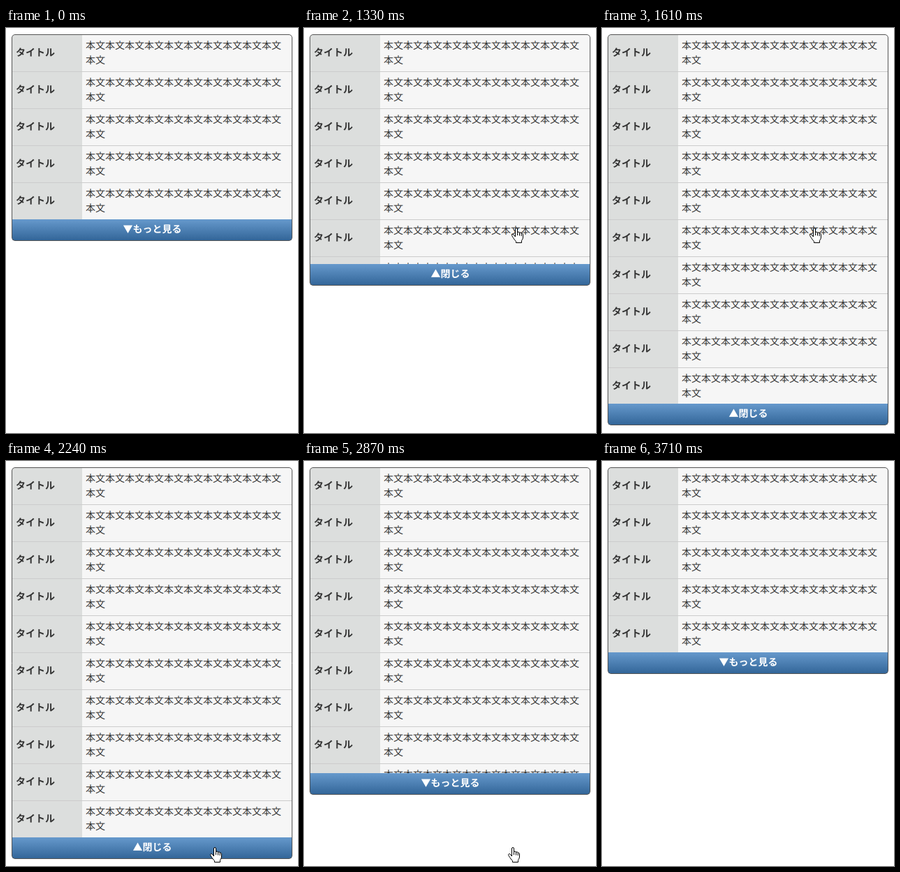
An HTML page with a canvas that plays this animation: 418x580 px, repeating every 4060 ms.

```html
<!DOCTYPE html>
<html lang="ja">
<head>
<meta charset="utf-8">
<title>もっと見る</title>
<style>
  html, body { margin: 0; width: 100%; height: 100%; overflow: hidden; background: #fff; }
  canvas { display: block; }
</style>
</head>
<body>
<canvas id="stage" width="418" height="580"></canvas>
<script>
const ctx = document.getElementById('stage').getContext('2d');
const LOOP = 4060, STEP = 70;
const ROW = 53, LEFT = 9, TOP = 10, WIDTH = 400, HEAD = 100, BUTTON = 30;
const CLOSED = ROW * 5 - 1, OPEN = ROW * 10 - 1;
const FAMILY = '"Noto Sans CJK JP", "Noto Sans CJK", "Noto Sans", sans-serif';
const BODY = '本文'.repeat(10);
// One ink per colour channel, a third of a pixel apart
const INKS = [['rgb(51,255,255)', 1 / 3], ['rgb(255,51,255)', 0], ['rgb(255,255,51)', -1 / 3]];

const HAND = new Path2D('M5.5 13V2Q5.5 .5 7 .5Q8.5 .5 8.5 2V7.5Q8.5 6 10 6Q11.5 6 11.5 7.8' +
  'Q11.5 6.6 13 6.8Q14.2 7 14.2 8.6Q14.2 7.6 15.3 8Q16.5 8.4 16.5 10V14Q16.5 16 14.5 18.5V21.5' +
  'H6.5V19.5Q4 17 2.5 14.5L.7 11.5Q.3 10 1.5 9.6Q3 9.4 4 11Z');
const FINGERS = new Path2D('M8.5 7.5V11M11.5 8V11.5M14.2 9V12');
const ARROW = new Path2D('M.5 .5V16.5L4.2 13L6.8 18.5L9.2 17.5L6.8 12H11.5Z');
const BEAM = new Path2D('M-3 -7.5H-1L0 -6.5L1 -7.5H3M0 -6.5V6.5M-3 7.5H-1L0 6.5L1 7.5H3');

const clamp = p => Math.min(1, Math.max(0, p));
const swing = p => 0.5 - Math.cos(Math.PI * clamp(p)) / 2;
const mix = (a, b, p) => a + (b - a) * p;

function panelHeight(t) {
  const shown = swing((t - 1186) / 442) - swing((t - 2693) / 442);
  return Math.round(mix(CLOSED, OPEN, shown));
}

function pointer(t) {
  if (t < 350 || t >= 3710) return null;
  if (t < 1890) {
    const p = clamp((t - 350) / 420), e = 1 - (1 - p) ** 2;
    const y = mix(521, 287, e);
    return { x: mix(313, 303, e) - 7 * Math.sin(Math.PI * e), y, kind: y < 305 ? 'hand' : 'arrow' };
  }
  if (t < 3500) {
    const e = swing((t - 1820) / 420), y = mix(287, 554, e);
    return { x: mix(303, 298, e), y, kind: y > 538 || y < 289 ? 'hand' : 'beam' };
  }
  const e = ((t - 3430) / 280) ** 2;
  return { x: 298 + 87 * e, y: 554 + 36 * e, kind: e < 0.1 ? 'hand' : 'arrow' };
}

function rect(color, x, y, w, h) {
  ctx.fillStyle = color;
  ctx.fillRect(x, y, w, h);
}

function bodyText(text, x, y) {
  ctx.globalCompositeOperation = 'multiply';
  for (const [ink, shift] of INKS) {
    ctx.fillStyle = ink;
    ctx.fillText(text, x + shift, y);
  }
  ctx.globalCompositeOperation = 'source-over';
}

function drawRow(y) {
  rect('#dcdedd', LEFT, y, HEAD, ROW);
  rect('#f6f6f6', LEFT + HEAD, y, WIDTH - HEAD, ROW);
  rect('#cccccc', LEFT, y + ROW - 1, WIDTH, 1);
  ctx.textAlign = 'left';
  ctx.font = 'bold 14px ' + FAMILY;
  ctx.fillStyle = '#333';
  ctx.fillText('タイトル', 14, y + 30);
  ctx.font = '14px ' + FAMILY;
  bodyText(BODY, 114, y + 20);
  bodyText('本文', 114, y + 41);
}

function drawButton(y, label) {
  const blue = ctx.createLinearGradient(0, y, 0, y + BUTTON);
  blue.addColorStop(0, '#6699cc');
  blue.addColorStop(1, '#336699');
  rect(blue, LEFT, y, WIDTH, BUTTON);
  ctx.font = 'bold 14px ' + FAMILY;
  ctx.textAlign = 'center';
  ctx.fillStyle = '#fff';
  ctx.fillText(label, LEFT + WIDTH / 2 + 0.5, y + 19);
}

function drawPanel(t) {
  const h = panelHeight(t), bottom = TOP + h;
  ctx.save();
  ctx.beginPath();
  ctx.roundRect(LEFT - 1, TOP - 1, WIDTH + 2, h + BUTTON + 2, 5);
  ctx.clip();
  for (let y = TOP; y < bottom; y += ROW) drawRow(y);
  drawButton(bottom, t >= 1190 && t < 2730 ? '▲閉じる' : '▼もっと見る');
  ctx.restore();
  ctx.beginPath();
  ctx.roundRect(LEFT - 0.5, TOP - 0.5, WIDTH + 1, h + BUTTON + 1, 4.5);
  ctx.lineWidth = 1;
  ctx.strokeStyle = '#555';
  ctx.stroke();
}

function drawPointer({ x, y, kind }) {
  ctx.save();
  ctx.translate(Math.round(x), Math.round(y));
  ctx.lineWidth = 1;
  ctx.strokeStyle = '#000';
  ctx.fillStyle = '#fff';
  ctx.lineJoin = 'round';
  if (kind === 'hand') {
    ctx.translate(-6, -1);
    ctx.fill(HAND);
    ctx.stroke(HAND);
    ctx.stroke(FINGERS);
  } else if (kind === 'arrow') {
    ctx.fill(ARROW);
    ctx.stroke(ARROW);
  } else {
    ctx.translate(0.5, 0.5);
    ctx.stroke(BEAM);
  }
  ctx.restore();
}

function draw(now) {
  const t = Math.floor((now % LOOP) / STEP) * STEP;
  rect('#fff', 0, 0, 418, 580);
  drawPanel(t);
  const p = pointer(t);
  if (p) drawPointer(p);
}

ctx.textBaseline = 'alphabetic';
ctx.textRendering = 'geometricPrecision';
const start = performance.now();
function tick() {
  draw(performance.now() - start);
  requestAnimationFrame(tick);
}
tick();
</script>
</body>
</html>
```
